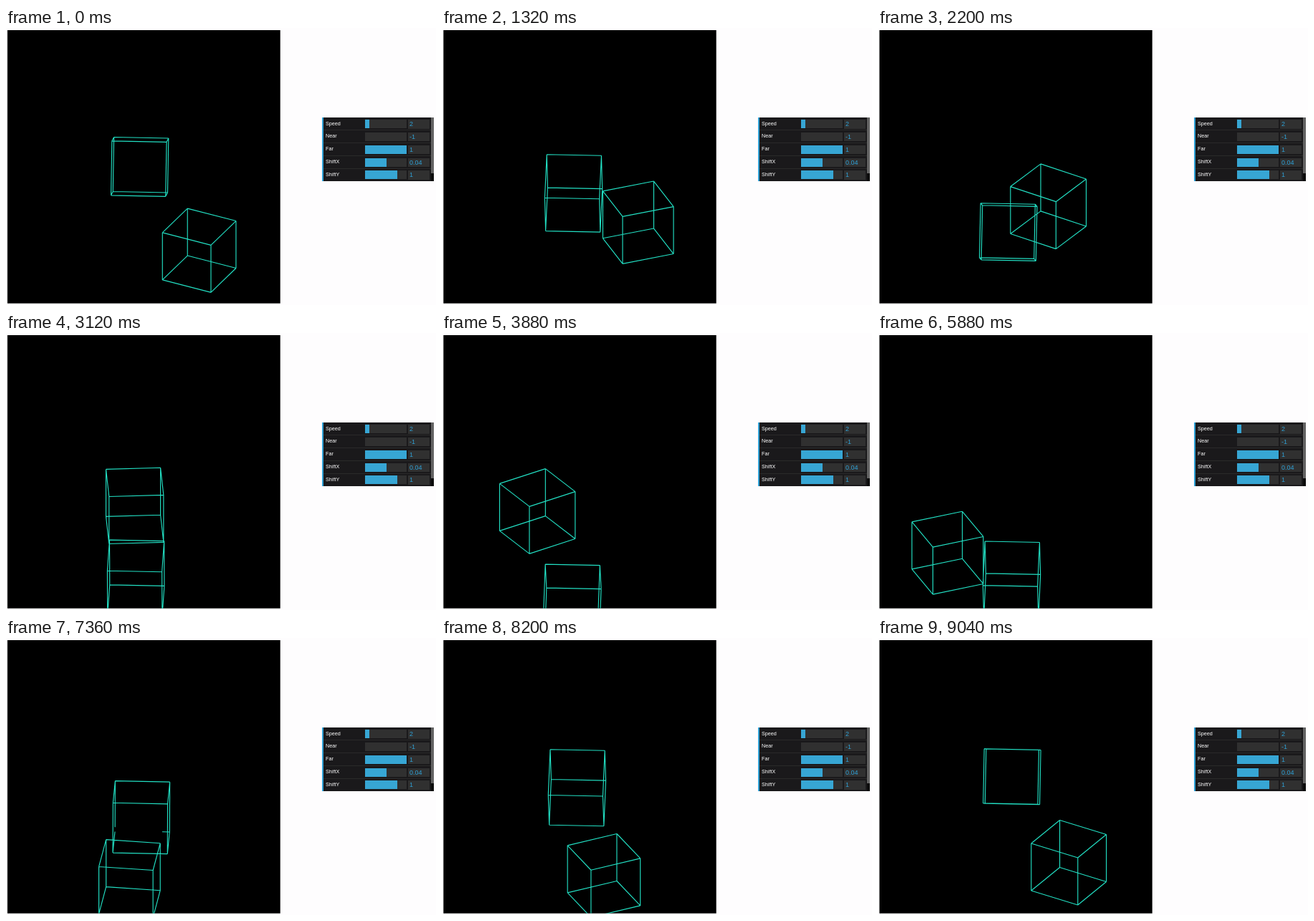
Recreate the animation shown at these times as an HTML page with a canvas. Size 600 by 387 pixels, loop 9.08 s.

```html
<!DOCTYPE html>
<html lang="en">
<head>
<meta charset="utf-8">
<title>Orbiting wireframe cubes</title>
<style>
  html, body { margin: 0; width: 100%; height: 100%; overflow: hidden; background: #fefdfe; }
  #stage { position: relative; width: 600px; height: 387px; overflow: hidden; }
  canvas { position: absolute; left: 0; top: 0; width: 600px; height: 387px; }
  #panel {
    position: absolute; left: 441px; top: 125px; width: 155.5px; height: 89px;
    overflow: hidden; background: #1a191b; color: #eee;
    font: 7.2px "Liberation Sans", Arial, sans-serif;
  }
  #panel::before {
    content: ""; position: absolute; z-index: 1; left: 0; top: 0;
    width: 2px; height: 100%; background: #2fa1d6;
  }
  .row { position: relative; height: 17.85px; }
  .row::after {
    content: ""; position: absolute; left: 2px; right: 4px; bottom: 0;
    height: 0.6px; background: #2a2a2a;
  }
  .row > * { position: absolute; }
  .label { left: 5px; top: 4.5px; line-height: 8px; color: #fff; }
  .slider { left: 60px; top: 3px; width: 57.5px; height: 12px; background: #303030; }
  .fill { height: 100%; background: #37a6d4; }
  .value {
    left: 120px; top: 3px; width: 28px; height: 12.6px; padding-left: 2px;
    background: #303030; color: #2fa1d6; font-size: 9px; line-height: 13.6px;
  }
  #bar { position: absolute; right: 0; top: 0; width: 3.5px; height: 100%; background: #0c0c0c; }
  #bar::before { content: ""; position: absolute; width: 100%; height: 78px; background: #636363; }
</style>
</head>
<body>
<div id="stage">
  <canvas></canvas>
  <div id="panel">
    <div class="row"><span class="label">Speed</span><div class="slider"><div class="fill" style="width:6px"></div></div><span class="value">2</span></div>
    <div class="row"><span class="label">Near</span><div class="slider"></div><span class="value">-1</span></div>
    <div class="row"><span class="label">Far</span><div class="slider"><div class="fill"></div></div><span class="value">1</span></div>
    <div class="row"><span class="label">ShiftX</span><div class="slider"><div class="fill" style="width:30px"></div></div><span class="value">0.04</span></div>
    <div class="row"><span class="label">ShiftY</span><div class="slider"><div class="fill" style="width:45px"></div></div><span class="value">1</span></div>
    <div id="bar"></div>
  </div>
</div>
<script>
const LOOP = 9080, STEP = 40;
const HALF = 38.1, ORBIT = 95.2;
const CENTER = [185, 288.9];
const FAR = -136.4;
const TILT = [0.02, 0.035];
const RAD = Math.PI / 180;

// The turn is nearly uniform: [ms, degrees]
const TURN = [[0, 4], [1320, 52.5], [3120, 124.5], [4680, 185.7],
              [5880, 233.9], [7360, 293.7], [9080, 361.4]];

const canvas = document.querySelector("canvas");
const ctx = canvas.getContext("2d");
const ratio = window.devicePixelRatio || 1;
canvas.width = 600 * ratio;
canvas.height = 387 * ratio;

function turnAt(t) {
  const i = TURN.findIndex(([ms]) => ms > t);
  const [t0, a0] = TURN[i - 1], [t1, a1] = TURN[i];
  return a0 + (a1 - a0) * (t - t0) / (t1 - t0);
}

function drawEdge(p, q) {
  if (p[2] < q[2]) [p, q] = [q, p];
  if (p[2] <= FAR) return;
  const k = q[2] < FAR ? (p[2] - FAR) / (p[2] - q[2]) : 1;
  ctx.moveTo(CENTER[0] + p[0], CENTER[1] + p[1]);
  ctx.lineTo(CENTER[0] + p[0] + (q[0] - p[0]) * k, CENTER[1] + p[1] + (q[1] - p[1]) * k);
}

// Axes are unit vectors in screen space, z towards the viewer
function drawCube(mid, axes) {
  const corner = n => mid.map((m, d) =>
    m + axes.reduce((sum, axis, i) => sum + (n >> i & 1 ? HALF : -HALF) * axis[d], 0));
  for (let n = 0; n < 8; n++)
    for (let bit = 1; bit < 8; bit *= 2)
      if (!(n & bit)) drawEdge(corner(n), corner(n | bit));
}

function tumbler(deg) {
  const s = Math.sin(deg * RAD), c = Math.cos(deg * RAD);
  const across = (y, z) => [-(TILT[0] * y + TILT[1] * z), y, z];
  const out = across(-c, s);
  drawCube(out.map(v => v * ORBIT), [[1, ...TILT], across(s, c), out]);
}

function spinner(deg) {
  const s = Math.sin(deg * RAD), c = Math.cos(deg * RAD);
  const sinP = 0.5, cosP = Math.sqrt(0.75);
  const out = [c, s * sinP, s * cosP];
  drawCube(out.map(v => v * ORBIT), [out, [-s, c * sinP, c * cosP], [0, cosP, -sinP]]);
}

function draw(now) {
  const t = Math.floor(now % LOOP / STEP) * STEP;
  const turn = turnAt(t);
  ctx.setTransform(ratio, 0, 0, ratio, 0, 0);
  ctx.clearRect(0, 0, 600, 387);
  ctx.save();
  ctx.beginPath();
  ctx.rect(2, 3, 380.7, 381.7);
  ctx.clip();
  ctx.fillStyle = "#000";
  ctx.fillRect(0, 0, 600, 387);
  ctx.beginPath();
  tumbler(turn);
  spinner(31.3 - turn);
  ctx.strokeStyle = "#22dfc3";
  ctx.lineWidth = 1.15;
  ctx.stroke();
  ctx.restore();
}

const start = performance.now();
function tick() {
  draw(performance.now() - start);
  requestAnimationFrame(tick);
}
tick();
</script>
</body>
</html>
```
